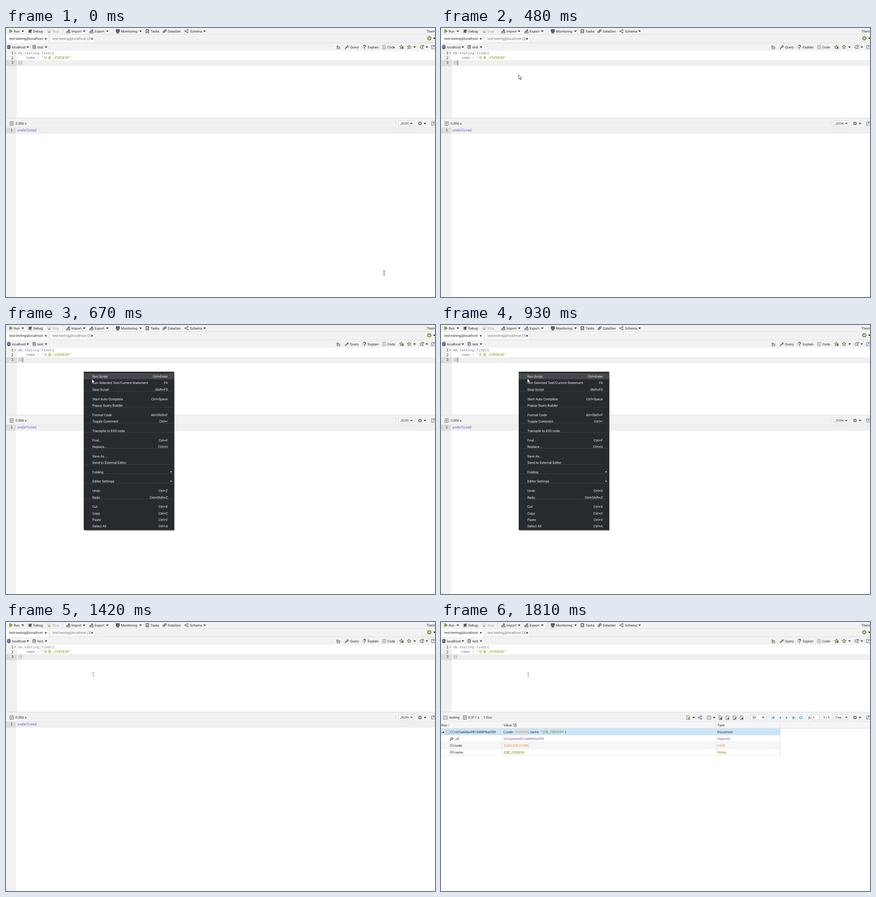
These frames come from a looping animation (944x593 px, 2470 ms). An HTML page:

```html
<!DOCTYPE html>
<html lang="en">
<head>
<meta charset="utf-8">
<title>Query editor</title>
<style>
html, body { margin: 0; height: 100%; overflow: hidden; background: #fff }
svg { display: block; width: 100%; height: 100% }
text { font: 7.45px Roboto, "Noto Sans CJK KR", "Noto Sans CJK", sans-serif; white-space: pre; text-rendering: geometricPrecision }
.mono { font: 7.75px "DejaVu Sans Mono", "Noto Sans CJK KR", "Noto Sans CJK", monospace }
.bold { font-weight: bold }
.id { font-size: 7.1px }
</style>
</head>
<body>
<svg id="stage" viewBox="0 0 944 593"></svg>
<script>
const INK = '#2b2b2b', BAR = '#f2f2f2', LINE = '#d9d9d9';

// Text is placed by its vertical middle.
const text = (x, y, s, color = INK, cls = '', anchor = 'start') =>
  `<text x="${x}" y="${y + 2.7}" fill="${color}" class="${cls}" text-anchor="${anchor}">${s}</text>`;
const rect = (x, y, w, h, fill, extra = '') =>
  `<rect x="${x}" y="${y}" width="${w}" height="${h}" fill="${fill}" ${extra}/>`;
const path = (x, y, d, fill = 'none', stroke = 'none', width = 1) =>
  `<path transform="translate(${x} ${y})" d="${d}" fill="${fill}" stroke="${stroke}" stroke-width="${width}"/>`;
const vline = (x, y, h, color = LINE) => rect(x, y, 1, h, color);
const hline = (x, y, w, color = LINE) => rect(x, y, w, 1, color);
const caretDown = (x, y) => path(x, y, 'M-2.7-1.3H2.7L0 1.7Z', '#111');
const group = (id, s) => `<g id="${id}">${s}</g>`;

const circle = r => `M${-r} 0a${r} ${r} 0 1 0 ${2 * r} 0a${r} ${r} 0 1 0 ${-2 * r} 0Z`;
const star = Array.from({ length: 10 }, (_, i) => {
  const a = i * Math.PI / 5, r = i % 2 ? 2 : 4.6;
  return (i ? 'L' : 'M') + (r * Math.sin(a)).toFixed(2) + ' ' + (-r * Math.cos(a)).toFixed(2);
}).join('') + 'Z';

const icons = {
  play: (x, y) => path(x, y, 'M-3-3.8L3.3 0-3 3.8Z', '#8cb536', '#4d6b20', .9),
  bug: (x, y) => path(x, y, 'M-4-3L3 4M-4 2L4-2M0-4L1 4M-3 4L4-4', 'none', '#333') +
    path(x, y, circle(2.6), '#5e682c', '#333', .8),
  disk: (x, y) => rect(x - 3.5, y - 3.5, 7, 7, '#d6ccaa') + rect(x - 2, y - 3, 4, 2.5, '#f4f1e4') + rect(x - 2, y + 1, 4, 2.5, '#aaa48e'),
  transfer: (x, y) => path(x, y, 'M-4 1L0-1 4 1V4H-4Z', '#b7bcc7', '#555b6b', .9) +
    path(x, y, 'M0-4H3V0H1L-1 2-3 0H0Z', '#646b91'),
  monitor: (x, y) => rect(x - 3.8, y - 3.8, 7.6, 5.5, '#59617f', 'stroke="#333" stroke-width=".8"') + path(x, y, 'M0 2V3.5M-3 4H3', 'none', '#333', 1.3),
  board: (x, y) => rect(x - 3, y - 3.3, 6, 7, '#fff', 'stroke="#333" stroke-width="1.1"') + path(x, y, 'M-1.5-3.7H1.5M-1.5 0L0 1.5 2-1', 'none', '#333', 1.1),
  chain: (x, y) => path(x - 1.8, y + 1.4, circle(2.1), 'none', '#555b6b', 1.3) +
    path(x + 1.8, y - 1.4, circle(2.1), 'none', '#555b6b', 1.3) + path(x, y, 'M-2 2L2-2', 'none', '#555b6b'),
  nodes: (x, y) => path(x, y, 'M-2 0L2-3M-2 0L2 3', 'none', '#555', .9) +
    [[-2.3, 0], [2.6, -2.7], [2.6, 2.7]].map(([a, b]) => path(x + a, y + b, circle(1.4), '#ddd', '#444', .9)).join(''),
  server: (x, y) => path(x, y, 'M-3-3L1-4.5 3.5-3V3L-.5 4.5-3 3Z', '#6a6796', '#3e3c5c', .8) + path(x, y, 'M-2-1L1-1.8M-2 1L1 .2', 'none', '#c5c3dd', .8),
  cylinder: (x, y) => path(x, y, 'M-3-3Q0-5.5 3-3V3Q0 5.5-3 3ZM-3-3Q0-1 3-3M-3 0Q0 2 3 0', '#d4d4d8', '#55555d', .9),
  lock: (x, y) => path(x, y, 'M-3 0V-2Q-2-5 0-2V0', 'none', '#555') + rect(x - 2.5, y - .5, 6, 4.5, '#d9d08f', 'stroke="#555" stroke-width=".8"'),
  wand: (x, y) => path(x, y, 'M-4 4L1-1', 'none', '#333', 1.6) + path(x, y, 'M0-4L4 1M3-4L1 1M0-1L4-2', 'none', '#555', .9),
  help: (x, y) => path(x, y, 'M-2-2Q-2-4 0-4 3-4 2-1L0 .5V2', 'none', '#444', 1.5) + rect(x - .8, y + 3, 1.6, 1.6, '#444') + path(x, y, 'M-3.5-3V3', 'none', '#888', .8),
  code: (x, y) => rect(x - 3.5, y - 4, 7, 8, '#f6f6ec', 'stroke="#8b8b80" stroke-width=".8"') + path(x, y, 'M-2-2H2M-2 0H1M-2 2H2', 'none', '#7d9163', .9),
  star: (x, y) => path(x, y, star, '#e7dc92', '#555', .9),
  starAdd: (x, y) => icons.star(x, y) + path(x, y, 'M1 2H5M3 0V4', 'none', '#333', 1.3),
  search: (x, y) => path(x, y, circle(3), '#eee7b5', '#555') + path(x, y, 'M2 2L4.5 4M1-4H5V0', 'none', '#555', 1.1),
  expand: (x, y) => rect(x - 3.5, y - 3.5, 8, 7, '#fff', 'stroke="#666f86"') + path(x, y, 'M-2 2L2-2M-1-2H2V1', 'none', '#666f86'),
  timer: (x, y) => rect(x - 3, y - 4, 7, 8, '#ececf0', 'stroke="#666" stroke-width=".9"') + path(x, y, 'M-1-2H3M-1 0H3', 'none', '#888', .8) + path(x - 2, y + 1.5, circle(2.1), '#fff', '#555', .8),
  gear: (x, y) => path(x, y, 'M-4 0H4M0-4V4M-3-3L3 3M-3 3L3-3', 'none', '#666', 1.3) + path(x, y, circle(2.4), '#ddd', '#666', 1.2),
  table: (x, y) => rect(x - 4, y - 3.5, 8.5, 7.5, '#f5f7fa', 'stroke="#77808e" stroke-width=".9"') + path(x, y, 'M-4-1H4.5M-4 1.5H4.5M-1-3.5V4M2-3.5V4', 'none', '#9aa2ad', .6),
  page: (x, y, mark) => path(x, y, 'M-3.2-4H1L3-2V4.2H-3.2Z', '#fafafa', '#555', .9) + path(x + 1.3, y + 1.5, mark, 'none', '#333', 1.2),
  chip: (x, y) => rect(x - 4, y - 2.3, 8, 4.8, '#eee', 'stroke="#888" stroke-width=".8"') + path(x, y, 'M-2-1V1.3M0-1V1.3M2-1V1.3', 'none', '#666', .8),
};

const select = (x, y, w, label) =>
  rect(x + .5, y + .5, w, 11, '#fff', 'stroke="#ccc" stroke-width=".8" rx="1"') +
  text(x + 4, y + 6, label) + path(x + w - 5, y + 6, 'M-2-1L0 1 2-1', 'none', '#111', 1.4);

function drawToolbars() {
  const tools = [
    ['play', 11, 'Run', 17, 37], ['bug', 53, 'Debug', 60], ['disk', 95, 'Stop', 102], ['transfer', 137, 'Import', 144, 172],
    ['transfer', 188, 'Export', 195, 223], ['monitor', 246, 'Monitoring', 253, 296], ['board', 311, 'Tasks', 318],
    ['chain', 349, 'DataGen', 356], ['nodes', 397, 'Schema', 405, 437],
  ];
  const shelf = [
    ['server', 6, 'localhost', 13, 48], ['cylinder', 62, 'test', 69, 88], ['lock', 731], ['wand', 750, 'Query', 757],
    ['help', 789, 'Explain', 796], ['code', 832, 'Code', 839], ['starAdd', 870], ['star', 887, '', 0, 899],
    ['search', 914, '', 0, 926], ['expand', 940],
  ];
  const row = (items, y) => items.map(([icon, x, label, tx, arrow]) =>
    icons[icon](x, y) + (label ? text(tx, y, label, label == 'Stop' ? '#a5a5a5' : INK) : '') + (arrow ? caretDown(arrow, y) : '')).join('');
  return rect(0, 0, 944, 50, BAR) + row(tools, 7) + vline(124, 1, 12) + vline(235, 1, 12) + text(925, 7, 'Theme') +
    hline(0, 14, 944, '#e3e3e3') + hline(0, 32, 944, '#e0e0e0') +
    rect(0, 15, 94, 18, '#fff') + rect(97, 16, 98, 16, '#f8f8f8') + vline(94, 15, 17) + vline(195, 16, 16, '#e4e4e4') +
    text(7, 23.3, 'test:testing@localhost') + text(102, 23.3, 'test:testing@localhost (3)', '#7c7c7c') +
    [87.5, 189.5].map(x => path(x, 23.7, 'M-1.6-1.6L1.6 1.6M-1.6 1.6L1.6-1.6', 'none', '#333', 1.3)).join('') +
    path(931.5, 22.7, circle(4.2), '#8fa052', '#5d6e2d', .8) + path(931.5, 22.7, 'M-2.3 0H2.3M0-2.3V2.3', 'none', '#fff', 1.3) +
    caretDown(942.5, 22.7) + rect(0, 33, 944, 17, BAR) + row(shelf, 42);
}

function drawEditor() {
  const name = '#77779c', punct = '#666', string = '#8a9410';
  return rect(0, 50, 24, 148, '#f0f0f0') + rect(24, 71, 920, 13, '#efefef') + rect(0, 71, 24, 13, '#dcdcdc') +
    [1, 2, 3].map(n => text(16.5, 44.4 + n * 10.7, n, '#333', 'mono', 'end')).join('') +
    path(20.5, 55.3, 'M-1.6-.8H1.6L0 1.2Z', '#555') +
    text(26.5, 55, 'db.testing.find', name, 'mono') + text(96.5, 55, '({', punct, 'mono') +
    text(45, 65.7, 'name', name, 'mono') + text(68.3, 65.7, ':', punct, 'mono') +
    text(78, 65.7, '"', string, 'mono') + text(83.3, 65.7, '상', string, 'mono') + text(92.5, 65.7, '품', string, 'mono') +
    text(101.2, 65.7, '_2505030"', string, 'mono') +
    rect(31.8, 71.8, 4.4, 9.4, 'none', 'stroke="#c4c4c4" stroke-width=".8"') +
    text(26.5, 76.4, '})', punct, 'mono') +
    hline(0, 198, 944, '#dadada') + rect(0, 199, 944, 21, BAR) + hline(0, 219.5, 944, '#e0e0e0') +
    icons.gear(911, 210.5) + caretDown(922, 210.5) + icons.expand(940, 210.5);
}

function drawUndefined() {
  return icons.timer(12, 210.5) + text(21, 210.5, '0.006 s') + vline(857, 204, 12) + select(863, 204, 34, 'JSON') +
    rect(0, 220, 22, 373, '#f2f2f2') + rect(22, 220, 922, 13, '#efefef') + rect(0, 220, 22, 13, '#dcdcdc') +
    text(15, 225.3, 1, '#333', 'mono', 'end') + text(25, 225.3, 'undefined', '#8888dc', 'mono bold');
}

function drawTable() {
  const blue = '#3fa4dc', orange = '#f08a24', purple = '#8a57b5', green = '#718c00', y = 210.5;
  const id = '622addda4f815d88ff6a2f59';
  const rowY = i => 242.4 + i * 14.85;
  const rows = [['_id', id, 'ObjectId', purple], ['code', '2,505,030 (2.5M)', 'Int32', orange], ['name', '상품_2505030', 'String', green]];
  const plus = 'M-2 0H2M0-2V2', cross = 'M-1.6-1.6L1.6 1.6M-1.6 1.6L1.6-1.6';
  const bar = icons.table(9.5, y) + text(18, y, 'testing') + icons.timer(52, y) + text(60, y, '0.011 s') + vline(89, 205, 12) + text(93, y, '1 Doc') +
    icons.page(544, y, plus) + rect(544, y, 4, 4, '#90a64a') + caretDown(556, y) + icons.nodes(569.5, y) + icons.table(589.5, y) + caretDown(601, y) +
    [circle(1.7), plus, 'M-2 2L2-2', cross].map((mark, i) => icons.page(615 + i * 15.5, y + .5, mark)).join('') +
    select(681, 204, 33, '50') +
    path(730.5, y + .5, 'M-2.5-2.7V2.7M2.5-2.7L-1.5 0 2.5 2.7Z', blue, blue, .8) + path(746, y + .5, 'M2-2.7L-2 0 2 2.7Z', blue) +
    path(761, y + .5, 'M-2-2.7L2 0-2 2.7Z', blue) + path(776.5, y + .5, 'M2.5-2.7V2.7M-2.5-2.7L1.5 0-2.5 2.7Z', blue, blue, .8) +
    path(792, y + .5, circle(2.6), 'none', blue, 1.2) +
    text(808.5, y, 'p.') + rect(815.5, 204.5, 17, 11, '#fff', 'stroke="#ccc" stroke-width=".8"') + text(818, y, 1) +
    text(841, y, '1 - 1') + select(863, 204, 34, 'Tree');
  const head = rect(0, 220, 944, 14.5, '#f5f5f5') + hline(0, 234, 944, '#dedede') +
    text(1, 227.5, 'Key') + path(16.5, 227.5, 'M-2-.7L0-3 2-.7M-2 .7L0 3 2 .7', 'none', '#aaa', .8) +
    text(137.5, 227.5, 'Value') + path(161.5, 227.8, 'M-3-3H3L1 0V3L-1 2V0ZM0-3H4V3H1', '#e5dfad', '#666', .8) + text(608, 227.5, 'Type');
  const doc = rect(0, 235, 746, 14.5, '#cce5fc') + path(4.5, 242.5, 'M2-2.3V2H-2.3Z', '#222') +
    rect(11.5, 238.8, 7, 7.5, '#f5f5f5', 'stroke="#888" stroke-width=".8"') + path(15, 242.5, 'M-1.5-2V2M1.5-2V2', 'none', '#777', .8) +
    text(21, rowY(0), '(1)') + text(31.5, rowY(0), id, INK, 'id') +
    text(137.5, rowY(0), `{ code : <tspan fill="${orange}">2505030</tspan>, name : <tspan fill="${green}">"상품_2505030"</tspan> }`) +
    text(608, rowY(0), 'Document');
  const fields = rows.map(([key, value, type, color], i) => {
    const ry = rowY(i + 1);
    const icon = i ? icons.chip(24, ry) : path(24, ry, circle(2.2) + 'M-1.5 1.5L-4 4M-3 3L-2 4', 'none', '#444', 1.2);
    return (i == 1 ? rect(0, ry - 7.2, 746, 14.5, '#f6f6f6') : '') + hline(0, ry + 6.8, 746, '#e8e8e8') +
      icon + text(30, ry, key) + text(137.5, ry, value, color, i ? '' : 'id') + text(608, ry, type, color);
  }).join('');
  return bar + head + doc + fields + [134, 605, 746].map(x => vline(x, 220, 74, '#e0e0e0')).join('');
}

function drawMenu() {
  const sections = `Run Script,Ctrl+Enter;Run Selected Text/Current Statement,F6;Stop Script,Shift+F5
Start Auto Complete,Ctrl+Space;Popup Query Builder
Format Code,Alt+Shift+F;Toggle Comment,Ctrl+/
Transpile to ES5 code
Find...,Ctrl+F;Replace...,Ctrl+H
Save As ...;Send to External Editor
Folding,>;Editor Settings
Undo,Ctrl+Z;Redo,Ctrl+Shift+Z
Cut,Ctrl+X;Copy,Ctrl+C;Paste,Ctrl+V;Select All,Ctrl+A`
    .replace('>;Editor Settings', '>\nEditor Settings,>').split('\n');
  let y = 113.4, items = '';
  sections.forEach((section, i) => {
    if (i) { items += hline(174, y - 11, 194, '#3d4145'); y += 6.4; }
    for (const item of section.split(';')) {
      const [label, key = ''] = item.split(',');
      items += text(190, y, label, '#f2f2f2');
      items += key == '>' ? path(363.5, y - .5, 'M-1.3-2.2L1.5 0-1.3 2.2Z', '#ddd') : text(356, y, key, '#f2f2f2', '', 'end');
      y += 14.35;
    }
  });
  return rect(174, 106, 197, 347.5, '#000', 'opacity=".4"') + rect(171, 103, 199, 349, '#272a2e') +
    group('hover', rect(171, 106, 199, 13.7, '#44484c')) + hline(171, 103, 199, '#1b1d20') + items;
}

const stage = document.getElementById('stage');
stage.innerHTML = rect(0, 0, 944, 593, '#fff') + drawToolbars() + drawEditor() +
  group('caret', rect(36.5, 71.5, 1, 10.5, '#444')) +
  group('pending', drawUndefined()) + group('result', drawTable()) + group('menu', drawMenu()) +
  group('click', path(190, 115, circle(7), '#b5b81c', 'none')) +
  group('beam', path(0, 0, 'M-2-4.5H-.7L0-4 .7-4.5H2M0-4V4M-2 4.5H-.7L0 4 .7 4.5H2', 'none', 'currentColor', .9)) +
  group('arrow', path(0, 0, 'M0 0V9.6L2.2 7.6 3.8 11.2 5.4 10.5 3.8 7H6.8Z', '#fff', '#222', .8));

const el = id => document.getElementById(id);
const show = (id, on) => el(id).setAttribute('visibility', on ? 'visible' : 'hidden');
const move = (id, x, y) => el(id).setAttribute('transform', `translate(${x} ${y})`);

// Pointer stops after the long sweep: time, x, y
const stops = [[480, 171, 103], [610, 181, 111], [670, 189, 119], [930, 190, 118], [1000, 190.5, 116], [1070, 191, 115], [1420, 192, 115.5]];

function pointerAt(t) {
  if (t >= 480) return stops.findLast(s => t >= s[0]).slice(1);
  const u = Math.floor(t / 70) / 6.86, k = u * u * (3 - 2 * u);
  return [832 - 661 * k, 540 - 437 * k];
}

function draw(now) {
  const t = now % 2470, menu = t >= 560 && t < 1420, arrow = t >= 480 && t < 1420;
  const done = t >= 1620;
  show('caret', t >= 480 && t < 1000);
  show('pending', !done);
  show('result', done);
  show('menu', menu);
  show('hover', menu && t >= 610);
  show('click', t >= 1290 && t < 1420);
  show('arrow', arrow);
  show('beam', !arrow);
  el('beam').style.color = t < 480 ? '#222' : '#8a8a8a';
  const [x, y] = pointerAt(t);
  move('beam', x, y);
  move('arrow', x, y);
}

const start = performance.now();
function tick() {
  draw(performance.now() - start);
  requestAnimationFrame(tick);
}
tick();
</script>
</body>
</html>
```
